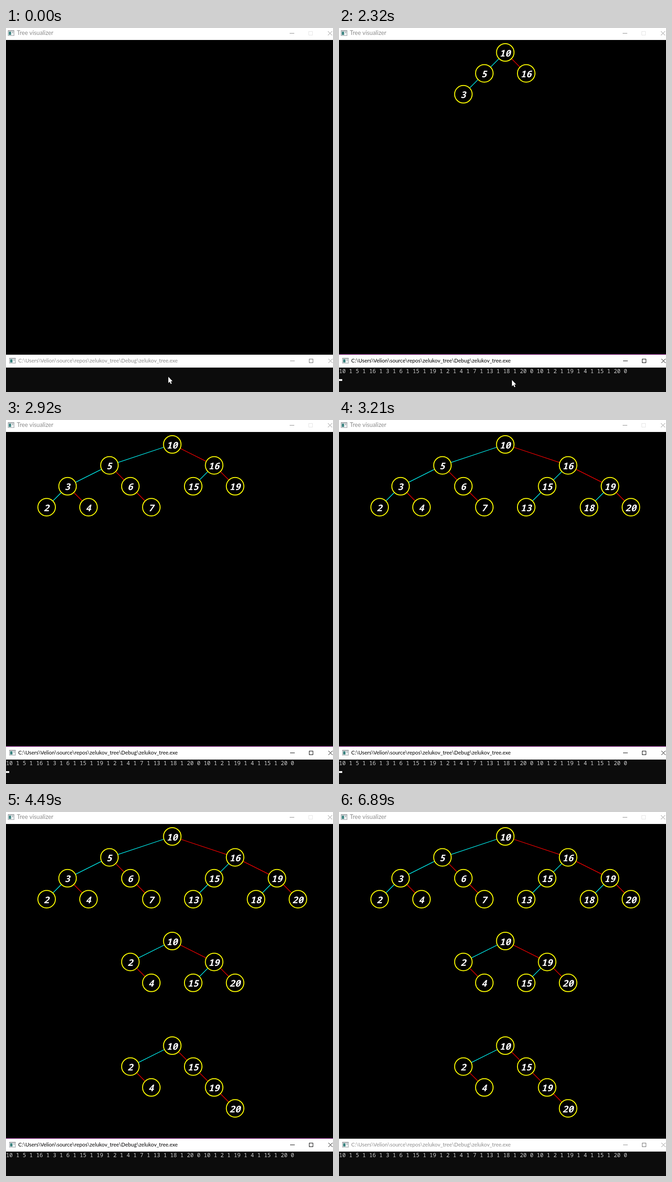
An HTML page with a canvas that plays this animation: 709x790 px, repeating every 7020 ms.

```html
<!DOCTYPE html>
<html lang="en">
<head>
<meta charset="utf-8">
<title>Tree visualizer</title>
<style>
  html, body { margin: 0; width: 100%; height: 100%; overflow: hidden; background: #000; }
  canvas { display: block; }
</style>
</head>
<body>
<canvas id="stage" width="709" height="790"></canvas>
<script>
const ctx = document.getElementById('stage').getContext('2d');
const LOOP = 7020, STEP = 45.4, RADIUS = 19, ROOT_X = 360.5, BLINK = 517;
const FOCUS = 410, MOUSE_MOVE = 850, PASTE = 1090, ENTER = 2020, MOUSE_GONE = 2860, BLUR = 6890;
const PATH = 'C:\\Users\\Velion\\source\\repos\\zelukov_tree\\Debug\\zelukov_tree.exe';
const CONSOLE_FONT = '12.11px "Noto Sans Mono", monospace';
const NODE_FONT = 'italic bold 20px "Noto Sans Mono", monospace';

// "1" announces another key, "0" ends a tree
const typed = '10 1 5 1 16 1 3 1 6 1 15 1 19 1 2 1 4 1 7 1 13 1 18 1 20 0 10 1 2 1 19 1 4 1 15 1 20 0';
const [first, second] = typed.split(/ 0 ?/).map(part => part.split(' 1 ').map(Number));
const common = preorder(buildTree(first)[0]).filter(key => second.includes(key));

// Keys are inserted one by one between start and end
const forest = [
  { keys: first, start: ENTER, end: 3210, ease: 1 },
  { keys: second, start: 3360, end: 3780, ease: 1.36 },
  { keys: common, start: 3930, end: 3930, ease: 1 }
];

function buildTree(keys) {
  const sorted = [...keys].sort((a, b) => a - b);
  const origin = sorted.indexOf(keys[0]);
  const nodes = [];
  for (const key of keys) {
    const node = { key, column: sorted.indexOf(key) - origin, depth: 0 };
    let next = nodes[0];
    while (next) {
      node.parent = next;
      node.depth = next.depth + 1;
      next = key < next.key ? next.left : next.right;
    }
    if (node.parent) node.parent[key < node.parent.key ? 'left' : 'right'] = node;
    nodes.push(node);
  }
  return nodes;
}

function preorder(node) {
  return node ? [node.key, ...preorder(node.left), ...preorder(node.right)] : [];
}

function rect(x, y, w, h, color) {
  ctx.fillStyle = color;
  ctx.fillRect(x, y, w, h);
}

function line(x1, y1, x2, y2, color, width = 1) {
  ctx.strokeStyle = color;
  ctx.lineWidth = width;
  ctx.beginPath();
  ctx.moveTo(x1, y1);
  ctx.lineTo(x2, y2);
  ctx.stroke();
}

function text(str, x, y, font, color, align = 'left') {
  ctx.font = font;
  ctx.fillStyle = color;
  ctx.textAlign = align;
  ctx.fillText(str, x, y);
}

function icon(x, y) {
  rect(x, y, 14, 12, '#9a9fa3');
  rect(x + 1, y + 2, 12, 9, '#eef1f2');
  rect(x + 2, y + 3, 5, 7, '#3f8582');
  rect(x + 9, y + 3, 3, 3, '#b5bcc0');
}

function titleBar(mid, iconX, title, size, ink, maxInk) {
  const buttonX = Math.round(iconX / 3) + 614;
  icon(iconX, mid - 6);
  text(title, iconX + 19.5, mid + 3.5, `${size}px Lato, sans-serif`, ink);
  line(buttonX, mid + .5, buttonX + 10, mid + .5, ink);
  ctx.strokeStyle = maxInk;
  ctx.strokeRect(buttonX + 41.5, mid - 3.5, 8, 8);
  const x = buttonX + 83, top = mid - 4;
  line(x, top, x + 9, top + 9, ink);
  line(x + 9, top, x, top + 9, ink);
}

function drawTree({ keys, start, end, ease }, row, t) {
  const insertedAt = i => start + (end - start) * (i / (keys.length - 1)) ** ease;
  const nodes = buildTree(keys.filter((_, i) => insertedAt(i) <= t));
  const px = node => ROOT_X + node.column * STEP;
  const py = node => 53 + (row * 5 + node.depth) * STEP;
  for (const node of nodes) {
    const p = node.parent;
    if (p) line(px(p), py(p), px(node), py(node), node.key < p.key ? '#0ff' : '#f00', 1.3);
  }
  for (const node of nodes) {
    ctx.beginPath();
    ctx.arc(px(node), py(node), RADIUS, 0, Math.PI * 2);
    ctx.fillStyle = '#000';
    ctx.fill();
    ctx.strokeStyle = '#ff0';
    ctx.lineWidth = 2;
    ctx.stroke();
    text(node.key, px(node) - .5, py(node) + 8.6, NODE_FONT, '#fff', 'center');
  }
}

function drawConsole(t) {
  rect(0, 737, 709, 53, '#0c0c0c');
  if (t >= PASTE) text(typed, 0, 748.5, CONSOLE_FONT, '#ccc');
  const blinkOn = t >= MOUSE_MOVE && Math.floor((t - MOUSE_MOVE) / BLINK) % 2 === 0;
  if (!blinkOn) return;
  ctx.font = CONSOLE_FONT;
  const onTypedLine = t >= PASTE && t < ENTER;
  const x = onTypedLine ? Math.round(ctx.measureText(typed).width) : 0;
  rect(x, t < ENTER ? 747 : 762, 7, 4, '#f2f2f2');
}

function drawMouse(t) {
  if (t >= MOUSE_GONE) return;
  const [x, y] = t < MOUSE_MOVE ? [352, 757] : [375, 764];
  ctx.fillStyle = '#fff';
  ctx.fill(new Path2D(`M${x} ${y}v13.5l3 -2.7 2.2 4.7 2.2 -.9 -2.2 -4.6 3.8 -.4z`));
}

function draw(t) {
  rect(0, 0, 709, 790, '#000');
  rect(0, 0, 709, 26, '#fff');
  titleBar(11, 4, 'Tree visualizer', 12.8, '#8c8c8c', '#e4e4e4');
  forest.forEach((tree, row) => drawTree(tree, row, t));

  const active = t >= FOCUS && t < BLUR;
  if (active) rect(0, 708, 709, 1, '#8a1088');
  rect(0, 709, 709, 28, '#fff');
  titleBar(722, 7, PATH, 11.5, active ? '#000' : '#8c8c8c', active ? '#000' : '#6c6c6c');
  drawConsole(t);
  drawMouse(t);
}

const start = performance.now();
function tick() {
  draw((performance.now() - start) % LOOP);
  requestAnimationFrame(tick);
}
tick();
</script>
</body>
</html>
```
